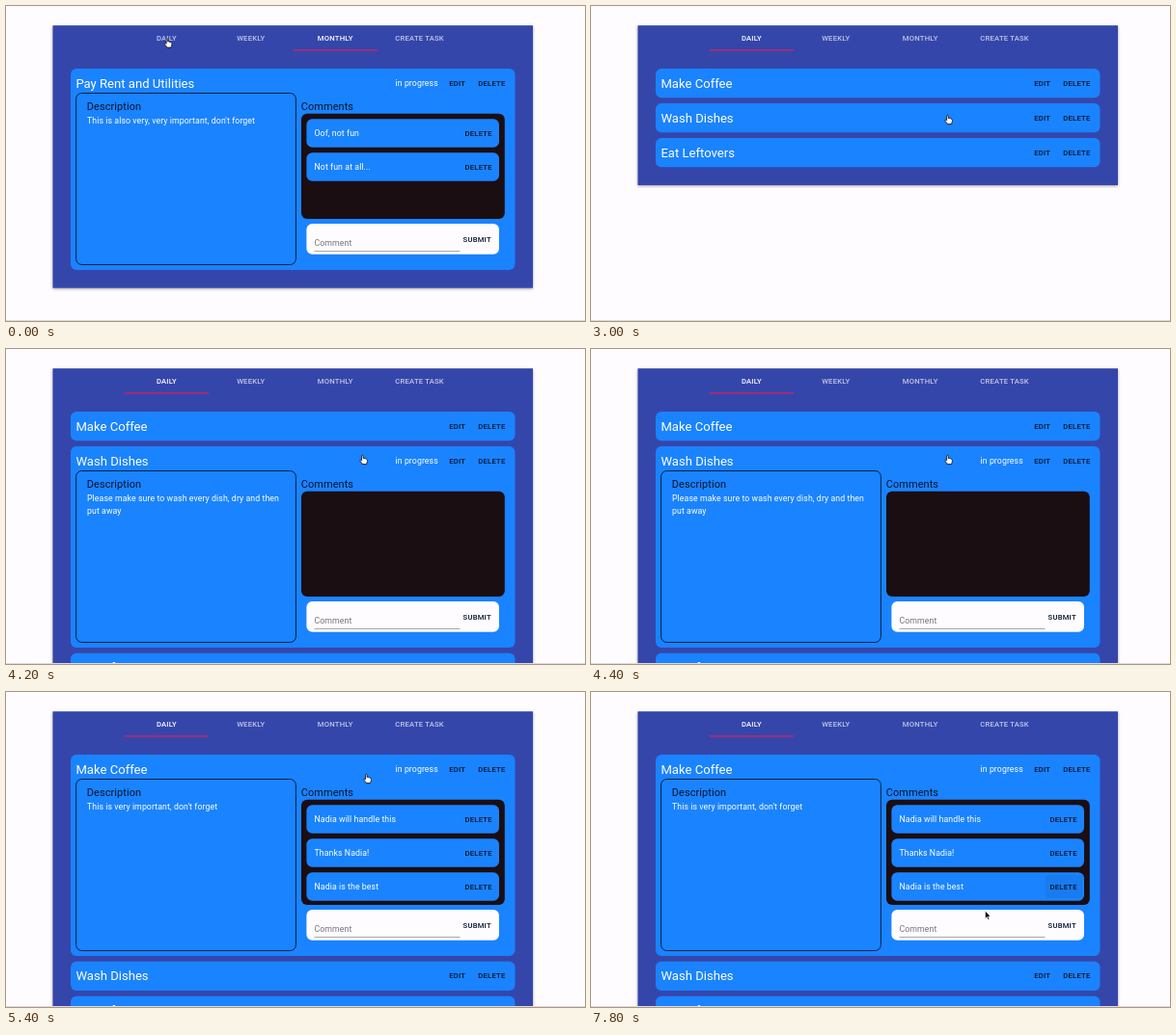
These frames come from a looping animation (600x327 px, 8 s). An HTML page:

```html
<!DOCTYPE html>
<html lang="en">
<head>
<meta charset="utf-8">
<title>Task board</title>
<style>
  html, body { margin: 0; width: 100%; height: 100%; overflow: hidden; background: #fefcff; }
  svg { display: block; width: 100vw; height: 100vh; }
  text { font-family: Roboto, sans-serif; white-space: pre; }
  .h5 { font-size: 13.1px; fill: #fff; }
  .h6 { font-size: 10.94px; letter-spacing: .0075em; fill: #06142c; }
  .body { font-size: 8.75px; letter-spacing: .00938em; fill: #fff; }
  .hint { fill: #74737a; }
  .btn { font-size: 7.66px; font-weight: 500; letter-spacing: .02857em; fill: #06142c; }
  .tab { fill: #fff; text-anchor: middle; }
  .panel { fill: #3546ab; filter: drop-shadow(0 1.4px 1.8px rgba(0, 0, 0, .38)); }
  .card { fill: #1a83ff; }
  .frame { fill: none; stroke: #0a1630; stroke-width: .9; }
  .well { fill: #1b0e13; }
  .form { fill: #fefcff; }
</style>
</head>
<body>
<svg id="stage" viewBox="0 0 600 327" preserveAspectRatio="none"></svg>
<script>
const LOOP = 8000, STEP = 200;
const stage = document.getElementById('stage');

function add(parent, tag, attrs = {}, content = '') {
  const el = document.createElementNS('http://www.w3.org/2000/svg', tag);
  for (const key in attrs) el.setAttribute(key, attrs[key]);
  el.textContent = content;
  return parent.appendChild(el);
}
const rect = (parent, cls, x, y, width, height, rx = 0) =>
  add(parent, 'rect', { class: cls, x, y, width, height, rx });
const label = (parent, cls, x, y, content) => add(parent, 'text', { class: cls, x, y }, content);

const TASKS = {
  rent: { title: 'Pay Rent and Utilities', lines: ["This is also very, very important, don't forget"],
          comments: ['Oof, not fun', 'Not fun at all...'] },
  coffee: { title: 'Make Coffee', lines: ["This is very important, don't forget"],
            comments: ['Nadia will handle this', 'Thanks Nadia!', 'Nadia is the best'] },
  dishes: { title: 'Wash Dishes', lines: ['Please make sure to wash every dish, dry and then', 'put away'],
            comments: [] },
  leftovers: { title: 'Eat Leftovers' }
};

function details(g, task) {
  label(g, 'body', 403.5, 18, 'in progress');
  rect(g, 'frame', 72.6, 25.5, 227.8, 178, 6);
  label(g, 'h6', 83.8, 43, 'Description');
  task.lines.forEach((line, i) => label(g, 'body', 84, 56.8 + i * 13.1, line));

  label(g, 'h6', 305.8, 42.7, 'Comments');
  rect(g, 'well', 306, 46.8, 210.8, 109.2, 6);
  task.comments.forEach((comment, i) => {
    const y = 52.2 + i * 35;
    rect(g, 'card', 311.4, y, 199.6, 29.6, 6);
    label(g, 'body', 319.5, y + 17.6, comment);
    label(g, 'btn', 475.6, y + 17.5, 'DELETE');
  });

  rect(g, 'form', 311.4, 161, 199.6, 31.7, 6);
  label(g, 'body hint', 319.5, 184.2, 'Comment');
  rect(g, '', 319.5, 189.2, 151, .7).setAttribute('fill', '#85838a');
  label(g, 'btn', 473.6, 179.8, 'SUBMIT');
}

function scene(names, open) {
  const g = add(stage, 'g');
  const height = name => name === open ? 209 : 30.3;
  const total = names.reduce((sum, name) => sum + height(name) + 5.7, 0);
  rect(g, 'panel', 48.5, 20.2, 497.5, 57.8 + total);
  let y = 65;
  for (const name of names) {
    const card = add(g, 'g', { transform: `translate(0 ${y})` });
    rect(card, 'card', 67, 0, 460.5, height(name), 6);
    label(card, 'h5', 72.4, 19.6, TASKS[name].title);
    label(card, 'btn', 459.2, 17.8, 'EDIT');
    label(card, 'btn', 489.3, 17.8, 'DELETE');
    if (name === open) details(card, TASKS[name]);
    y += height(name) + 5.7;
  }
  return g;
}

const daily = ['coffee', 'dishes', 'leftovers'];
const scenes = [
  [0, scene(['rent'], 'rent')],
  [1200, scene(daily)],
  [3400, scene(daily, 'dishes')],
  [4600, scene(daily)],
  [5400, scene(daily, 'coffee')]
];

const tabs = ['DAILY', 'WEEKLY', 'MONTHLY', 'CREATE TASK'].map((name, i) =>
  label(stage, 'btn tab', 166.4 + i * 87.4, 36, name));
const bar = rect(stage, '', 0, 45.2, 87.4, 1.3);
bar.setAttribute('fill', '#d4215f');
const hover = rect(stage, '', 471, 190, 38, 24, 2);
rect(stage, '', 0, 326, 600, 1).setAttribute('fill', '#dcdadd');

const hand = add(stage, 'path', {
  d: 'M-2.4-3.9a.8.8 0 0 1 1.6 0v2.4c.6-.4 1.3-.2 1.5.3 .6-.3 1.2 0 1.4.5 .7-.2 1.3.2 1.3.9v1.5c0 1.2-.8 1.6-.8 2.9h-4.3c-.1-1.2-1.6-2-2.3-3.4-.4-.9.6-1.4 1.2-.8l.4.4z',
  fill: '#fff', stroke: '#111', 'stroke-width': .85, 'stroke-linejoin': 'round'
});
const arrow = add(stage, 'path', {
  d: 'M-2.3-4.5V3.4L-.5 1.8.7 4.6 2 4 .8 1.3H3.3z',
  fill: '#000', stroke: '#fff', 'stroke-width': .6
});

// time, x, y of the pointer
const path = [
  [0, 168.5, 38.5], [200, 169, 38.5], [1000, 169, 38.5], [1200, 176, 48.5], [1800, 176, 48.5],
  [2800, 370, 117], [3000, 371, 118], [3400, 371, 118], [3600, 371, 115], [4600, 371, 115],
  [5000, 375, 90], [5600, 375, 90], [6600, 415, 130], [7200, 488, 200], [7600, 488, 202],
  [7800, 410.8, 231.8], [8000, 410.8, 231.8]
];

function pointAt(t) {
  const i = path.findIndex(p => p[0] > t);
  const [t0, x0, y0] = path[i - 1], [t1, x1, y1] = path[i];
  const k = (t - t0) / (t1 - t0), e = k * k * (3 - 2 * k);
  return [x0 + (x1 - x0) * e, y0 + (y1 - y0) * e];
}

function draw(t) {
  const current = scenes.filter(s => s[0] <= t).pop();
  for (const s of scenes) s[1].style.display = s === current ? '' : 'none';

  const selected = t < 1200 ? 2 : 0;
  tabs.forEach((tab, i) => tab.setAttribute('fill-opacity', i === selected ? 1 : .7));
  bar.setAttribute('x', t < 1200 ? 297.4 : t < 1400 ? 143 : 122.7);
  hover.setAttribute('fill-opacity', t >= 7200 ? .06 : 0);

  const [x, y] = pointAt(t);
  const onButton = x > 471 && y > 190;
  const pointing = t < 5600 || y < 96 || onButton;
  hand.style.display = pointing ? '' : 'none';
  arrow.style.display = pointing ? 'none' : '';
  for (const c of [hand, arrow]) c.setAttribute('transform', `translate(${x} ${y})`);
}

function tick() {
  const t = performance.now() % LOOP;
  draw(Math.floor(t / STEP) * STEP);
  requestAnimationFrame(tick);
}
tick();
</script>
</body>
</html>
```
